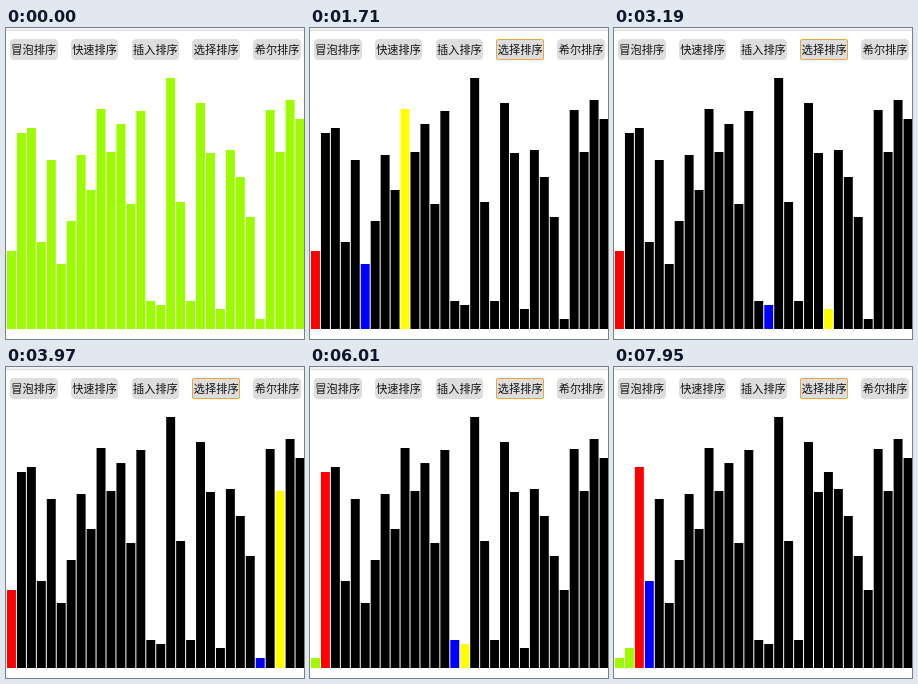
Recreate the animation shown at these times as an HTML page with a canvas. Size 298x311 px, loop 8 s.

```html
<!DOCTYPE html>
<html lang="zh-CN">
<head>
<meta charset="utf-8">
<title>排序</title>
<style>
  html, body { margin: 0; width: 100%; height: 100%; overflow: hidden; background: #fff; }
  body { position: relative; }
  canvas { position: absolute; left: 0; top: 0; display: block; }
  .edge { position: absolute; left: 0; top: 0; width: 298px; height: 2px; background: #f3f3f3; border-bottom: 1px solid #dcdcdc; }
  .button {
    position: absolute; top: 11px; left: calc(3.8px + 60.85px * var(--i));
    box-sizing: border-box; width: 47.8px; height: 21px;
    border: 1px solid #ddd; border-radius: 4px; background: #ddd;
    font: 300 11.2px/19px "Noto Sans CJK SC", "Noto Sans CJK", sans-serif;
    color: #111; text-align: center; white-space: nowrap;
  }
  .button.focused { border-color: #e8a93c; border-radius: 2px; }
</style>
</head>
<body>
<div class="edge"></div>
<div class="button" style="--i:0">冒泡排序</div>
<div class="button" style="--i:1">快速排序</div>
<div class="button" style="--i:2">插入排序</div>
<div class="button" id="selection" style="--i:3">选择排序</div>
<div class="button" style="--i:4">希尔排序</div>
<canvas id="stage" width="298" height="311"></canvas>
<script>
const LOOP = 8000, BASE = 301, PITCH = 9.95, BAR = 8.95;
const GREEN = '#9dfb00';
const heights = [78, 196, 201, 87, 169, 65, 108, 174, 139, 220, 177, 205, 125, 218, 28,
  24, 251, 127, 28, 226, 176, 20, 179, 152, 112, 10, 219, 177, 229, 210];

// Bursts of sort steps: first time, last time, number of steps.
const bursts = [
  [850, 1080, 4], [1240, 1400, 3], [1550, 1710, 3], [1860, 2020, 3], [2170, 2410, 4],
  [2560, 2720, 3], [2870, 3040, 3], [3190, 3350, 3], [3500, 3660, 3], [3810, 4050, 4],
  [4210, 4370, 3], [4520, 4770, 4], [4920, 5070, 3], [5230, 5390, 3], [5540, 5700, 3],
  [5860, 6010, 3], [6160, 6320, 3], [6470, 6630, 3], [6790, 7010, 4], [7160, 7320, 3],
  [7480, 7710, 4], [7870, 7950, 2]
];
const stepTimes = bursts.flatMap(([from, to, n]) =>
  Array.from({ length: n }, (_, k) => from + (to - from) * k / (n - 1)));

// Pointer ring: time, x, y.
const pointerPath = [
  [70, 248, 266], [150, 246, 238], [230, 242, 196], [310, 236, 148], [390, 228, 100],
  [470, 220, 62], [540, 214, 38], [620, 212, 28], [850, 212, 30], [930, 217, 68],
  [1000, 225, 136], [1080, 232, 204], [1160, 238, 262], [1240]
];

function* selectionSort(values) {
  const a = [...values];
  const view = (i, min, j) => ({ values: [...a], i, min, j });
  for (let i = 0; i < a.length - 1; i++) {
    let min = i;
    for (let j = i + 1; j < a.length; j++) {
      yield view(i, min, j);
      if (a[j] < a[min]) {
        min = j;
        yield view(i, min, -1);
      }
    }
    [a[i], a[min]] = [a[min], a[i]];
    yield view(i, i, -1);
  }
}

const sorter = selectionSort(heights);
const steps = stepTimes.map(() => sorter.next().value);
const ctx = document.getElementById('stage').getContext('2d');
const button = document.getElementById('selection');

function barColor(k, step) {
  if (!step || k < step.i) return GREEN;
  if (k === step.i) return '#f00';
  if (k === step.j) return '#ff0';
  return k === step.min ? '#00f' : '#000';
}

function drawRing(x, y) {
  ctx.beginPath();
  ctx.arc(x, y, 10.3, 0, 2 * Math.PI);
  ctx.lineWidth = 2;
  ctx.strokeStyle = 'rgba(160, 160, 160, 0.7)';
  ctx.stroke();
}

function render() {
  const t = performance.now() % LOOP;
  const step = steps[stepTimes.filter(s => s <= t).length - 1];
  const pointer = pointerPath.filter(p => p[0] <= t).pop();

  ctx.clearRect(0, 0, 298, 311);
  (step ? step.values : heights).forEach((h, k) => {
    ctx.fillStyle = barColor(k, step);
    ctx.fillRect(1 + PITCH * k, BASE - h, BAR, h);
  });
  if (pointer && pointer.length === 3) drawRing(pointer[1], pointer[2]);
  button.classList.toggle('focused', !!step);
  requestAnimationFrame(render);
}
render();
</script>
</body>
</html>
```
